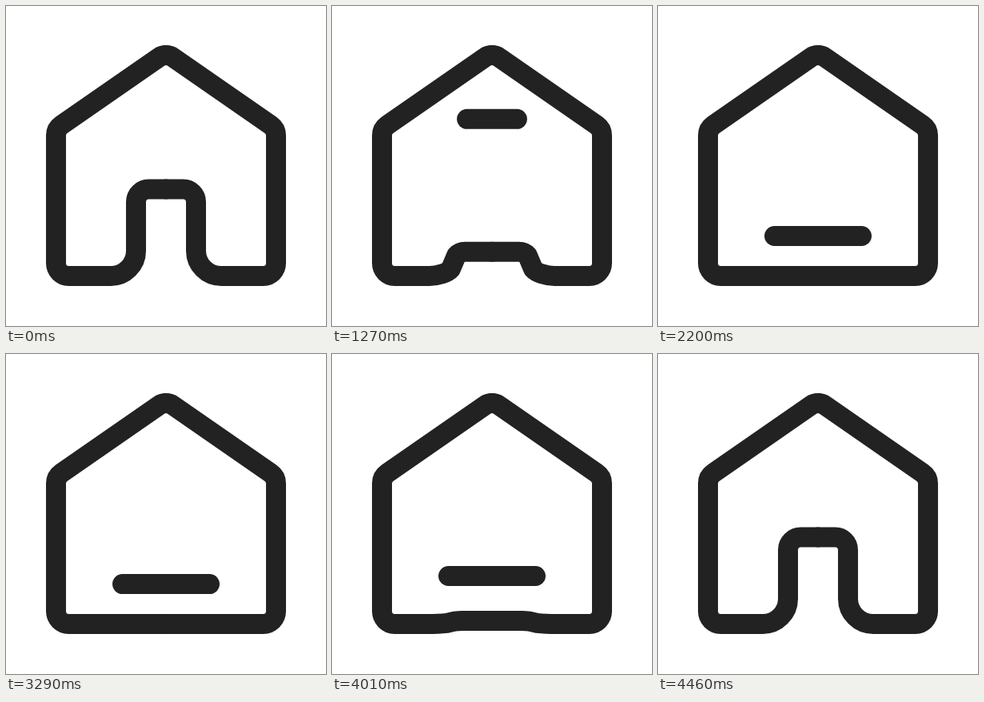
Animation, 400 px wide and 400 px high, one loop 4520 ms. Source, as an HTML page with a canvas:

```html
<!DOCTYPE html>
<html lang="en">
<head>
<meta charset="utf-8">
<title>Home icon</title>
<style>
  html, body { margin: 0; width: 100%; height: 100%; overflow: hidden; background: #fff; }
  canvas { display: block; width: 100vw; height: 100vh; }
</style>
</head>
<body>
<canvas width="400" height="400"></canvas>
<script>
const ctx = document.querySelector('canvas').getContext('2d');
const LOOP = 4520, STEP = 30, STEPS = 40, OPEN_AT = 1000, CLOSE_AT = 3260;
const FLOOR = 337.5, WALL = -137.5, CORNER = 16;
const ROOF_SLOPE = 0.693, ROOF_TOP = 61.6, EAVES = 153.5;

const clamp = (v, lo = 0, hi = 1) => Math.min(hi, Math.max(lo, v));
const mix = (a, b, p) => a + (b - a) * p;

// Cubic easing with control points (x1, 0) and (x2, 1).
function ease(u, x1, x2) {
  if (u <= 0 || u >= 1) return clamp(u);
  let lo = 0, hi = 1;
  for (let i = 0; i < 30; i++) {
    const s = (lo + hi) / 2, r = 1 - s;
    if (3 * r * r * s * x1 + 3 * r * s * s * x2 + s * s * s < u) lo = s;
    else hi = s;
  }
  return lo * lo * (3 - 2 * lo);
}

// Left half of the house, with x measured from the centre line.
function halfHouse(flat) {
  const at = (x0, y0, x1) => [mix(x0, x1, flat), mix(y0, FLOOR, flat)];
  const top = -Math.PI / 2;
  ctx.beginPath();
  ctx.arc(0, ROOF_TOP + CORNER, CORNER, top, top - Math.atan(ROOF_SLOPE), true);
  ctx.arcTo(WALL, EAVES, WALL, FLOOR, CORNER);
  ctx.arcTo(WALL, FLOOR, 0, FLOOR, CORNER);
  ctx.lineTo(...at(-69, FLOOR, -82));
  ctx.bezierCurveTo(...at(-51.6, FLOOR, -74), ...at(-37.5, 323.4, -63), ...at(-37.5, 306, -57));
  ctx.lineTo(...at(-37.5, 245, -47));
  ctx.bezierCurveTo(...at(-37.5, 236, -44), ...at(-30.3, 229, -41), ...at(-21.5, 229, -38));
  ctx.lineTo(...at(0, 229, 0));
  ctx.stroke();
}

function draw(n) {
  const flat = ease(n / 21, 0.64, 0);
  const drop = ease(n / 27.5, 0.641, -0.033);
  const settle = ease((n - 27) / 13, 0.33, 0.33);
  const barY = mix(62, 305.5, drop) - 18 * settle;
  const barHalf = 54.5 * Math.sin(Math.min(1.884 * drop, Math.PI / 2));

  ctx.setTransform(1, 0, 0, 1, 0, 0);
  ctx.fillStyle = '#fff';
  ctx.fillRect(0, 0, 400, 400);
  ctx.strokeStyle = '#222';
  ctx.lineWidth = 25;
  ctx.lineCap = ctx.lineJoin = 'round';
  for (const side of [1, -1]) {
    ctx.setTransform(side, 0, 0, 1, 200, 0);
    halfHouse(flat);
  }
  if (n > 0) {
    ctx.beginPath();
    ctx.moveTo(-barHalf, barY);
    ctx.lineTo(barHalf, barY);
    ctx.stroke();
  }
}

function frame() {
  const t = performance.now() % LOOP;
  const stepsSince = start => clamp(Math.floor((t - start) / STEP), 0, STEPS);
  draw(stepsSince(OPEN_AT) - stepsSince(CLOSE_AT));
  requestAnimationFrame(frame);
}
frame();
</script>
</body>
</html>
```
